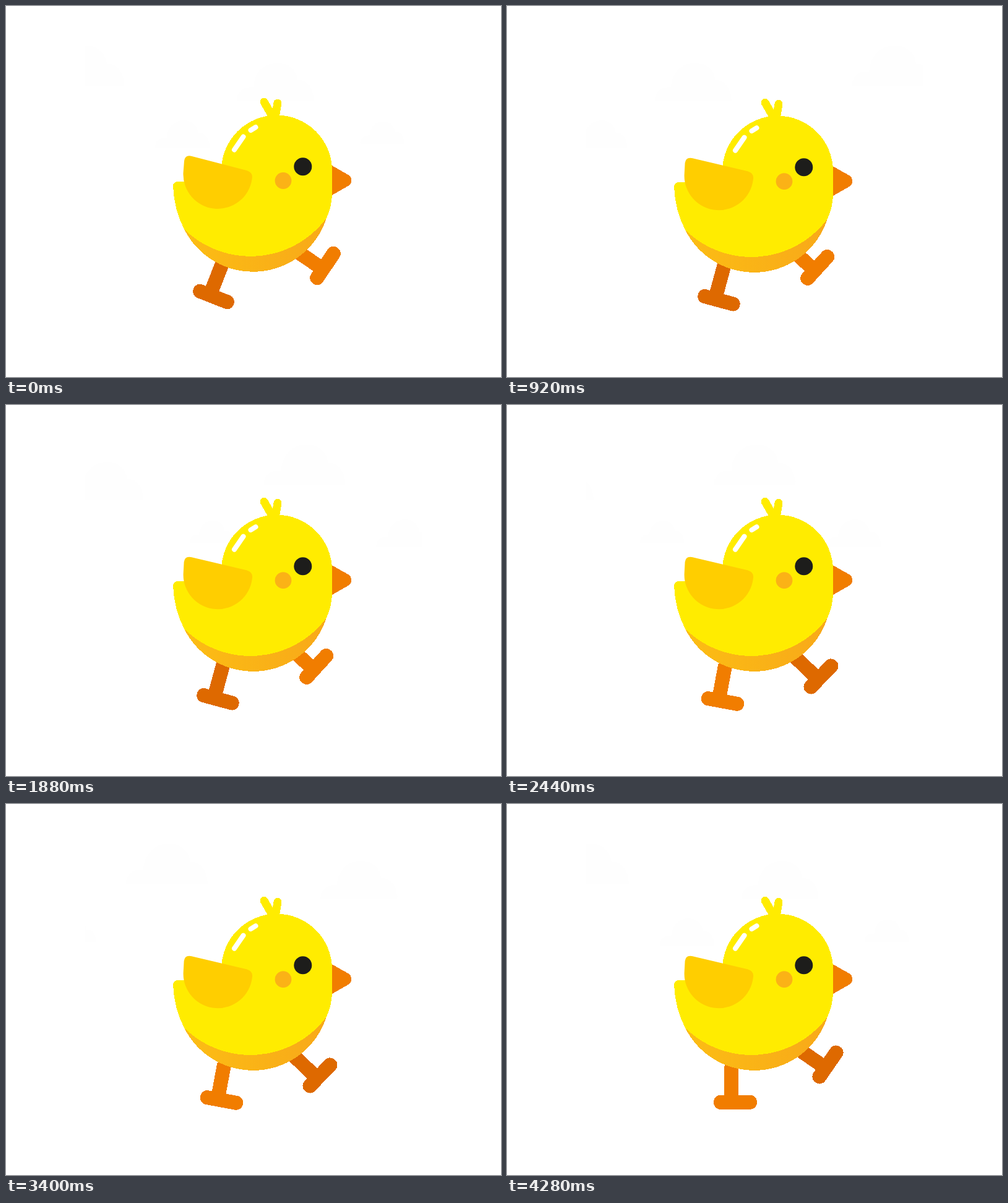
Recreate the animation shown at these times as an HTML page. Size 800 px wide and 600 px high, loop 4320 ms.

```html
<!DOCTYPE html>
<html lang="en">
<head>
<meta charset="utf-8">
<title>Running chick</title>
<style>
  html, body { margin: 0; width: 100%; height: 100%; overflow: hidden; background: #fff; }
  svg { display: block; width: 800px; height: 600px; }
  .crisp { shape-rendering: crispEdges; }
</style>
</head>
<body>
<svg viewBox="0 0 800 600">
  <defs>
    <clipPath id="sky"><rect x="128" y="40" width="544" height="220"/></clipPath>
    <linearGradient id="belly">
      <stop offset="0" stop-color="#fcbd14"/>
      <stop offset="1" stop-color="#f8a919"/>
    </linearGradient>
    <path id="cloud" d="M-66 66C-66 48-52 40-38 42C-34-12 34-12 38 30C54 28 66 44 66 66Z"/>
    <g id="leg" class="crisp">
      <rect x="-18" y="-62" width="23" height="64" rx="6"/>
      <rect x="-35" y="-11.5" width="70" height="23" rx="11"/>
    </g>
  </defs>

  <g id="clouds" clip-path="url(#sky)" fill="#fefefe"></g>

  <use id="farLeg" href="#leg" fill="#de6900"/>
  <use id="nearLeg" href="#leg" fill="#f17d00"/>

  <g id="body">
    <g class="crisp">
      <path fill="#f17d00" d="M525 257L554 273.5Q558 276 558 282Q558 288 554 290.5L525 307Z"/>
      <path stroke="#ffec00" stroke-width="13" stroke-linecap="round" d="M417 155L432 181M439 157L435 181"/>
      <path fill="#ffec00" d="M270 292Q270 284 278 284H348V266A89.5 89.5 0 0 1 527 266V300C527 317 524 330 518 343A124.5 124.5 0 0 1 288 361C278 342 271 318 270 292Z"/>
      <path fill="url(#belly)" d="M288 361A153 153 0 0 0 518 343A124.5 124.5 0 0 1 288 361Z"/>
    </g>
    <path fill="none" stroke="#fff" stroke-width="8" stroke-linecap="round" d="M369 232.5L383.5 211.5M395.5 201L403.5 196"/>
    <circle cx="479.8" cy="259.7" r="14.5" fill="#1d1d1b"/>
    <circle cx="448" cy="282.5" r="13.4" fill="#fbb216"/>
    <path id="wing" fill="#ffce00" d="M286.5 270L288 250.5Q289.5 240.5 299.5 242.7L389 266Q400 269.5 397.5 280A55.8 55.8 0 0 1 286.5 270Z"/>
  </g>
</svg>
<script>
  const LOOP = 4320, STRIDE = 960, BOB = 480, TICK = 40;
  const FAR_LEAD = 600, SKY_WIDTH = 633;
  const $ = id => document.getElementById(id);

  // Key poses of a foot, shared by both legs: [ms, x, y, forward angle]
  const steps = [
    [0, 516, 420, 56],           // reach
    [80, 518.5, 421.5, 55.3],
    [160, 507.5, 439, 46],
    [440, 369, 482.3, 0],        // stand
    [520, 348.5, 479, -10.5],
    [600, 335.5, 470, -21.5],    // push off
    [740, 292, 434, -58],        // kick
    [920, 501.7, 423, 47.6]
  ];

  // x at start, top, scale
  const clouds = [[125, 64, 1], [435.5, 92, .94], [285, 185, .67], [608, 187, .54]]
    .map(([x, y, scale]) => {
      const el = document.createElementNS("http://www.w3.org/2000/svg", "use");
      el.setAttribute("href", "#cloud");
      $("clouds").append(el);
      return { el, x, y, scale };
    });

  const place = (el, transform) => el.setAttribute("transform", transform);

  // Key pose by index, continuing into earlier and later strides
  function key(i) {
    const n = steps.length;
    const [ms, ...pose] = steps[(i + n) % n];
    return [ms + STRIDE * Math.floor(i / n), ...pose];
  }

  // Smooth cyclic curve through the key poses
  function poseAt(t) {
    const i = steps.findLastIndex(s => s[0] <= t);
    const [a, b, c, d] = [i - 1, i, i + 1, i + 2].map(key);
    const span = c[0] - b[0], u = (t - b[0]) / span;
    return [1, 2, 3].map(k => {
      const m0 = (c[k] - a[k]) / (c[0] - a[0]) * span;
      const m1 = (d[k] - b[k]) / (d[0] - b[0]) * span;
      const gap = c[k] - b[k];
      return b[k] + u * (m0 + u * (3 * gap - 2 * m0 - m1 + u * (m0 + m1 - 2 * gap)));
    });
  }

  function placeLeg(el, t) {
    const [x, y, angle] = poseAt(t % STRIDE);
    place(el, `translate(${x} ${y}) rotate(${-angle})`);
  }

  function draw(t) {
    const drop = (1 - Math.cos(2 * Math.PI * t / BOB)) / 2;
    place($("body"), `translate(0 ${17 * drop})`);
    place($("wing"), `rotate(${-20 * drop} 392 268)`);
    placeLeg($("nearLeg"), t);
    placeLeg($("farLeg"), t + FAR_LEAD);
    for (const c of clouds) {
      let x = c.x - SKY_WIDTH * t / LOOP;
      if (x < 60) x += SKY_WIDTH;
      place(c.el, `translate(${x} ${c.y}) scale(${c.scale})`);
    }
  }

  const start = performance.now();
  function tick() {
    const t = (performance.now() - start) % LOOP;
    draw(Math.floor(t / TICK) * TICK);
    requestAnimationFrame(tick);
  }
  tick();
</script>
</body>
</html>
```
